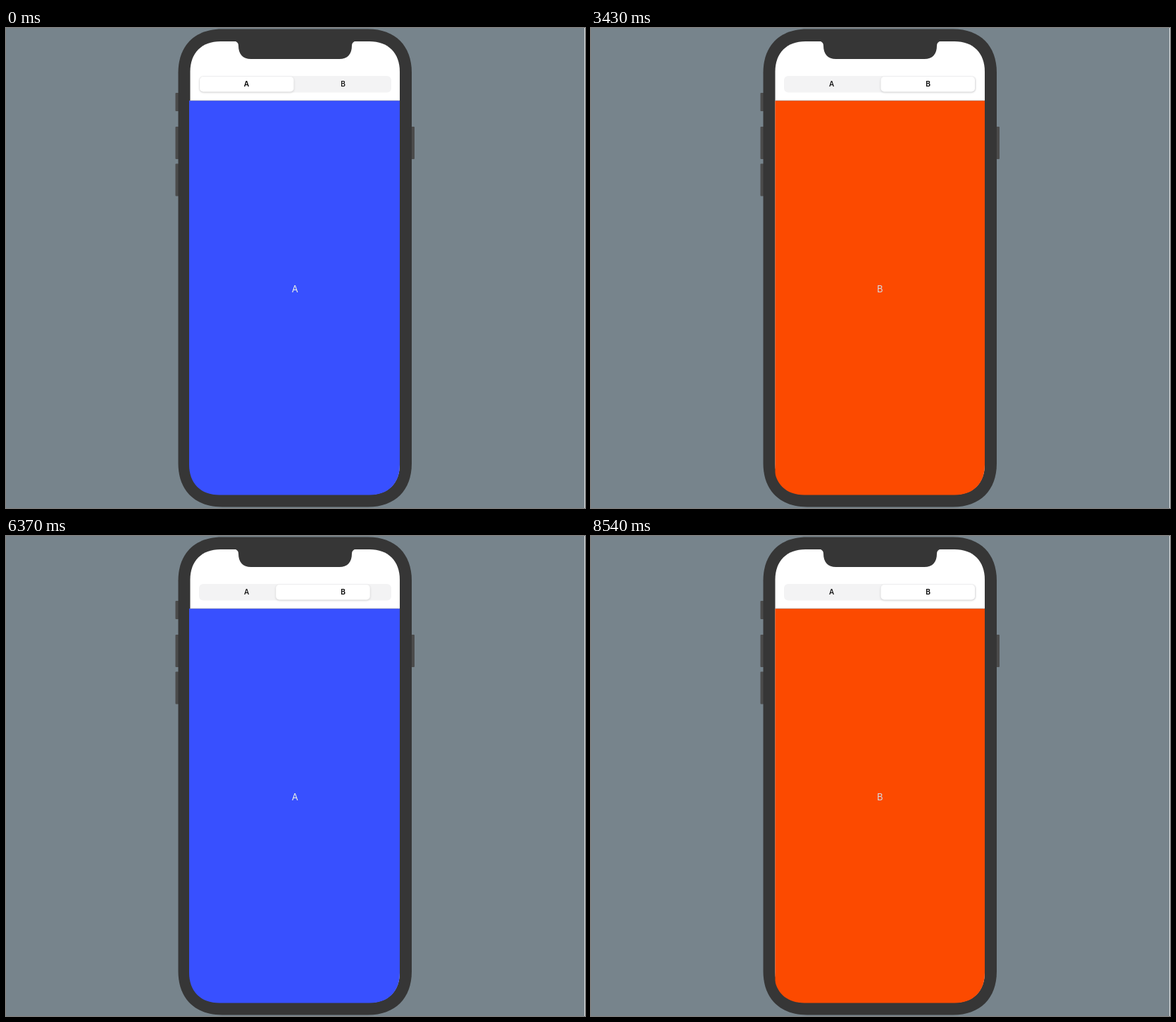
An HTML page that plays this animation: 822 by 681 pixels, repeating every 8610 ms.

```html
<!DOCTYPE html>
<html lang="en">
<head>
<meta charset="utf-8">
<title>Segmented control</title>
<style>
  html, body { margin: 0; width: 100%; height: 100%; overflow: hidden; background: #77848c; }
  svg { display: block; width: 822px; height: 681px; }
  text { font-family: Inter, "Open Sans", sans-serif; text-anchor: middle; }
  .tab { font-size: 10.2px; fill: #000; }
  #thumb { filter: drop-shadow(0 1px 1.5px rgba(0, 0, 0, .16)); }
</style>
</head>
<body>
<svg viewBox="0 0 822 681">
  <defs><clipPath id="screenClip"><path id="screenShape"/></clipPath></defs>
  <rect width="822" height="681" fill="#77848c"/>
  <rect x="821" width="1" height="681" fill="#d9dde0"/>
  <g fill="#4b4b4b">
    <rect x="240.5" y="92" width="5" height="26" rx="1"/>
    <rect x="240.5" y="140" width="5" height="46" rx="1"/>
    <rect x="240.5" y="192.500" width="5" height="46" rx="1"/>
    <rect x="575" y="140" width="5" height="46" rx="1"/>
  </g>
  <path id="body" fill="#363636"/>
  <path id="screen" fill="#fff"/>
  <g clip-path="url(#screenClip)">
    <rect id="page" y="103" height="560"/>
    <rect x="261" y="102.500" width="298" height="1" fill="#8f8f98" opacity=".6"/>
  </g>
  <path d="M324 18.500Q330 19.500 330 25C330 37 336 44 348 44H473C485 44 491 37 491 25Q491 19.500 497 18.500Z" fill="#363636"/>
  <rect x="274" y="68" width="273" height="23.500" rx="6" fill="#f3f3f4"/>
  <rect id="thumb" y="69" width="133.500" height="21.500" rx="5" fill="#fff"/>
  <text id="tabA" class="tab" x="341.500" y="83.300">A</text>
  <text id="tabB" class="tab" x="478.500" y="83.300">B</text>
  <text id="label" x="410.300" y="374.800" font-size="13"></text>
</svg>
<script>
const LOOP = 8610, TICK = 70;
const THUMB_A = 275, THUMB_B = 411.5;
const SPRING = 0.0209;      // critically damped, rad per ms
const PAGE_DELAY = 200;     // page swaps this long after the thumb starts
const taps = [
  { time: 2097, to: "B" },
  { time: 4095, to: "A" },
  { time: 6229, to: "B" }
];
const pages = {
  A: { fill: "#3850ff", text: "#eef3e2", x: 260 },
  B: { fill: "#fc4a00", text: "#d5dde3", x: 261.5 }
};
const el = id => document.getElementById(id);

// Rounded rectangle with continuous corners.
function softRect(x, y, right, bottom, r) {
  const k = r * 0.38;
  return `M${x + r} ${y}H${right - r}C${right - k} ${y} ${right} ${y + k} ${right} ${y + r}` +
    `V${bottom - r}C${right} ${bottom - k} ${right - k} ${bottom} ${right - r} ${bottom}` +
    `H${x + r}C${x + k} ${bottom} ${x} ${bottom - k} ${x} ${bottom - r}` +
    `V${y + r}C${x} ${y + k} ${x + k} ${y} ${x + r} ${y}Z`;
}

const spring = t => 1 - (1 + SPRING * t) * Math.exp(-SPRING * t);

function render(t) {
  let selected = "A", shown = "A", thumbX = THUMB_A;
  for (const { time, to } of taps) {
    const age = t - time;
    if (age < 0) break;
    const target = to === "A" ? THUMB_A : THUMB_B;
    thumbX += (target - thumbX) * spring(age);
    selected = to;
    if (age >= PAGE_DELAY) shown = to;
  }
  const page = pages[shown];
  el("thumb").setAttribute("x", thumbX);
  el("tabA").setAttribute("font-weight", selected === "A" ? 600 : 500);
  el("tabB").setAttribute("font-weight", selected === "B" ? 600 : 500);
  el("page").setAttribute("x", page.x);
  el("page").setAttribute("width", 559 - page.x);
  el("page").setAttribute("fill", page.fill);
  el("label").setAttribute("fill", page.text);
  el("label").textContent = shown;
}

el("body").setAttribute("d", softRect(244.5, 1.5, 576, 679.5, 62));
el("screen").setAttribute("d", softRect(261.5, 19, 559, 662, 43));
el("screenShape").setAttribute("d", softRect(260, 19, 559, 662.5, 43));

const start = performance.now();
function frame() {
  const t = (performance.now() - start) % LOOP;
  render(Math.floor(t / TICK) * TICK);
  requestAnimationFrame(frame);
}
frame();
</script>
</body>
</html>
```
